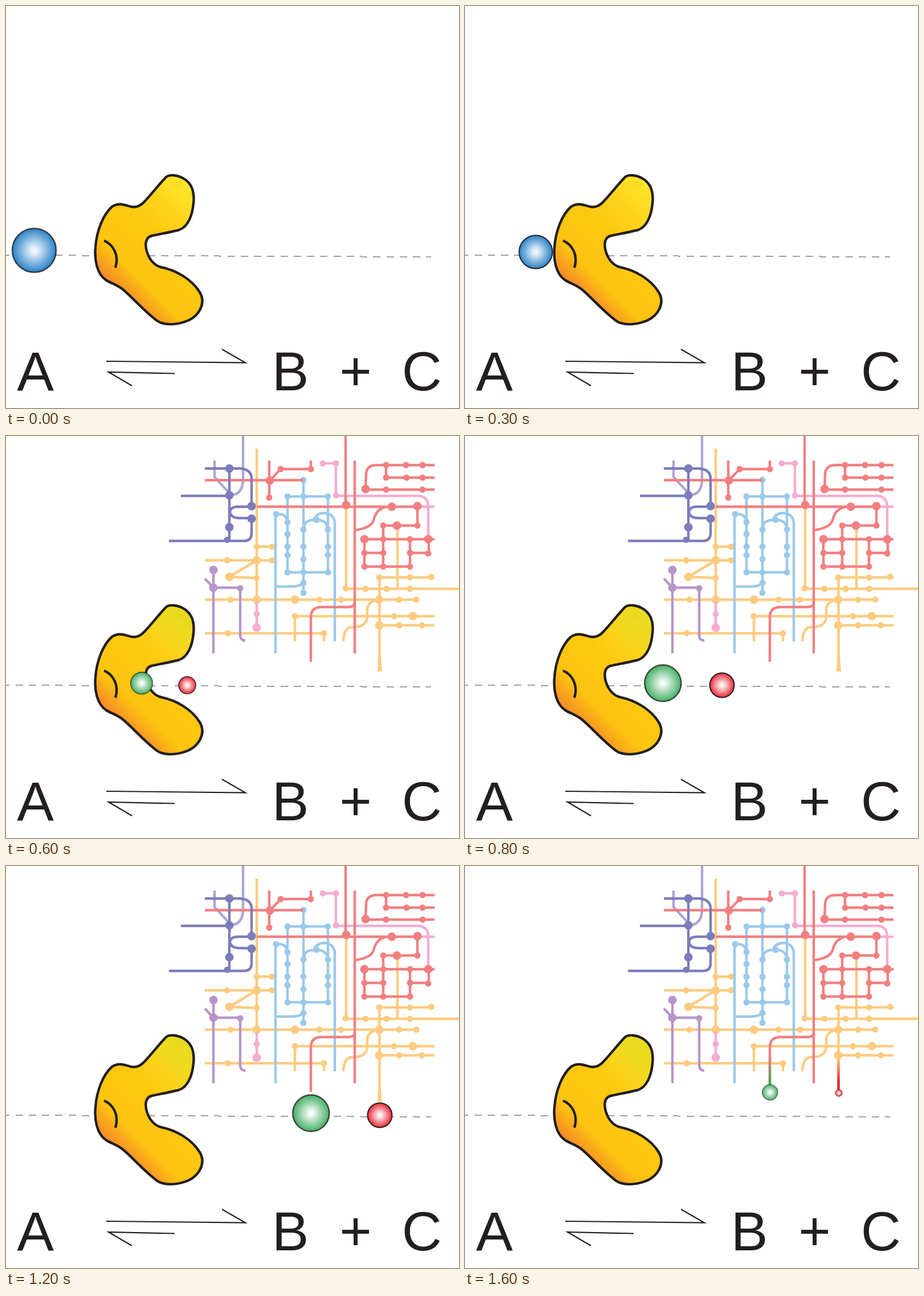
An HTML page for the animation above (1900 ms loop, 795 px wide and 705 px high).

```html
<!DOCTYPE html>
<html lang="en">
<head>
<meta charset="utf-8">
<title>Enzyme reaction</title>
<style>
html, body { margin: 0; width: 100%; height: 100%; overflow: hidden; background: #fff; }
svg { display: block; width: 795px; height: 705px; }
text { font: 97px "Liberation Sans", Arial, sans-serif; text-anchor: middle; fill: #231f20; }

.ink { fill: none; stroke: #231f20; stroke-width: 4.4; }
.map { fill: none; stroke-width: 4.4; stroke-linejoin: round; }
.dots { stroke-width: 11; stroke-linecap: round; }
.big { stroke-width: 15; stroke-linecap: round; }
.indigo { stroke: #7b7dbb; }
.lavender { stroke: #aaa7d4; }
.red { stroke: #f27f80; }
.pink { stroke: #f4add0; }
.orange { stroke: #fdcb80; }
.blue { stroke: #9ac9ea; }
.violet { stroke: #b994c9; }

/* 17 poses of 100 ms, the last one held to 1900 ms */
.phase2, .stub, .glow, .ball { animation: 1.9s step-end infinite; }
.phase2 { animation-name: show; }
.stub { animation-name: drop; }
.glow { animation-name: glow; }
.ball { stroke: #231f20; stroke-width: 2; }
#a { animation-name: enter, leave; vector-effect: non-scaling-stroke; }
#b { animation-name: exitB; }
#c { animation-name: exitC; }

@keyframes show { 0% { opacity: 0; } 31.578%, 100% { opacity: 1; } }
@keyframes leave { 0% { opacity: 1; } 31.578%, 100% { opacity: 0; } }
@keyframes drop { 0% { opacity: 1; } 84.21%, 100% { opacity: 0; } }
@keyframes glow {
  0% { opacity: 0; }
  63.157% { opacity: 0; animation-timing-function: steps(4); }
  84.21%, 100% { opacity: 1; }
}
@keyframes enter {
  0% { transform: translate(49.5px, 428.5px); animation-timing-function: steps(2); }
  10.526% { transform: translate(94.3px, 428.5px); animation-timing-function: steps(3); }
  26.315%, 100% { transform: translate(183.8px, 437px) scale(.275); }
}
@keyframes exitB {
  0%, 31.578% { transform: translate(238px, 433.5px) scale(.6); animation-timing-function: steps(2); }
  42.105% { transform: translate(347.3px, 433.5px); animation-timing-function: steps(2); }
  52.631% { transform: translate(462.5px, 433.5px); animation-timing-function: steps(2); }
  63.157% { transform: translate(535.3px, 433.5px); animation-timing-function: steps(4); }
  84.21%, 100% { transform: translate(535.3px, 397px) scale(.43); }
}
@keyframes exitC {
  0%, 31.578% { transform: translate(318px, 437px) scale(.7); animation-timing-function: steps(2); }
  42.105% { transform: translate(451px, 437px); animation-timing-function: steps(2); }
  52.631% { transform: translate(562px, 437px); animation-timing-function: steps(2); }
  63.157% { transform: translate(656px, 437px); animation-timing-function: steps(4); }
  84.21%, 100% { transform: translate(656px, 398px) scale(.29); }
}
</style>
</head>
<body>
<svg viewBox="0 0 795 705">
  <defs>
    <linearGradient id="body" gradientUnits="userSpaceOnUse" x1="180" y1="490" x2="345" y2="325">
      <stop offset="0" stop-color="#f4832d"/>
      <stop offset=".2" stop-color="#fdc40f"/>
      <stop offset=".5" stop-color="#fdc70f"/>
      <stop offset=".75" stop-color="#fed61d"/>
      <stop offset="1" stop-color="#ffe92c"/>
    </linearGradient>
    <linearGradient id="tip" gradientUnits="userSpaceOnUse" x1="270" y1="375" x2="318" y2="312">
      <stop offset="0" stop-color="#e2d81e" stop-opacity="0"/>
      <stop offset="1" stop-color="#e2d81e" stop-opacity=".85"/>
    </linearGradient>
    <radialGradient id="fillA">
      <stop offset="0" stop-color="#f2f8fd"/>
      <stop offset=".15" stop-color="#e4f0fa"/>
      <stop offset="1" stop-color="#2a82c7"/>
    </radialGradient>
    <radialGradient id="fillB">
      <stop offset="0" stop-color="#fff"/>
      <stop offset=".15" stop-color="#eff8f1"/>
      <stop offset="1" stop-color="#45b065"/>
    </radialGradient>
    <radialGradient id="fillC">
      <stop offset="0" stop-color="#fff"/>
      <stop offset=".15" stop-color="#fdeeee"/>
      <stop offset="1" stop-color="#ec2836"/>
    </radialGradient>
    <linearGradient id="tailB" gradientUnits="userSpaceOnUse" x1="0" y1="335" x2="0" y2="384">
      <stop offset="0" stop-color="#f27f80"/>
      <stop offset="1" stop-color="#36a85a"/>
    </linearGradient>
    <linearGradient id="tailC" gradientUnits="userSpaceOnUse" x1="0" y1="336" x2="0" y2="378">
      <stop offset="0" stop-color="#fdcb80"/>
      <stop offset="1" stop-color="#e8202f"/>
    </linearGradient>
    <path id="enzyme" d="M279 302C285 294 302 296 314 304C327 313 331 328 329 346C327 368 319 388 303 393C286 397 270 400 256 403C246 405 243 416 247 430C251 444 260 455 272 458C298 463 326 479 340 502C352 522 338 545 316 553C300 559 278 561 265 552C240 533 222 511 205 497C195 489 186 487 176 481C159 470 155 444 157 423C159 395 170 366 186 352C196 345 206 348 216 351C228 355 236 351 243 343C256 329 267 315 279 302Z"/>
  </defs>

  <line x1="0" y1="437" x2="746" y2="440" stroke="#a0a0a4" stroke-width="2" stroke-dasharray="13 10.25" stroke-dashoffset="6.5" shape-rendering="crispEdges"/>

  <g class="map phase2">
    <g class="lavender">
      <path d="M416 0V75Q416 104 392 104M366 43V72L392 100"/>
    </g>
    <g class="orange">
      <path d="M440 22V288M440 194H467M349 218H467M440 249L392 247L440 218M349 287H720M597 121V268H795M687 157V268"/>
      <path d="M752 248H655.5V396M507 360V316H752M655 332H752M349 346H558V360M592 360Q593 336 607 335Q632 336 634 318V305Q634 290 655 287"/>
      <path class="stub" d="M653.3 385L652 413H660L657.7 385Z" fill="#fdcb80" stroke="none"/>
      <path class="dots" d="M440 194h0M467 194h0M388 218h0M467 218h0M440 249h0M394 287h0M550 287h0M588 287h0M690 287h0M720 287h0M596 267h0M631 268h0M668 268h0M709 268h0M655 248h0M709 248h0M746 247h0M507 316h0M681 316h0M690 332h0M730 332h0M558 346h0M389 346h0"/>
      <path class="big" d="M440 218h0M392 247h0M440 287h0M507 287h0M655 287h0M714 316h0M655 332h0"/>
    </g>
    <g class="blue">
      <path d="M522 77V275M494 106H565V239H494ZM524 163V155Q527 147 545 147Q563 147 565 163M541 146Q545 135 560 135Q577 137 577 155V360M473 381V137H480Q492 137 494 151M474 264H505Q520 262 522 258"/>
      <path class="dots" d="M522 77h0M522 275h0M494 106h0M522 106h0M565 106h0M494 239h0M522 239h0M565 239h0M494 151h0M494 172h0M494 194h0M494 209h0M522 164h0M522 194h0M522 216h0M565 164h0M565 194h0M565 209h0M545 147h0M474 137h0M522 258h0"/>
    </g>
    <g class="pink">
      <path d="M554 48H579V105H725Q741 107 741 124V181M722 124H752M440 290V337"/>
      <path class="dots" d="M556 48h0M579 48h0M579 104h0M440 312h0"/>
      <path class="big" d="M440 336h0"/>
    </g>
    <g class="red">
      <path d="M349 77.5H522M462 43V108M463 78L482 58H535V43M440 124H722V157H662V229M596 0V121M612 43V381M612 165Q640 162 645 148Q650 126 670 124"/>
      <path d="M752 181H629V229H709V181M629 205H662M709 205H742V181M752 51H650Q634 51 632 65L631 94H752M667 51V73H752"/>
      <path d="M535 396V318Q535 301 552 300H600Q612 300 612 292"/>
      <path class="dots" d="M462 108h0M482 58h0M535 58h0M662 157h0M722 157h0M662 181h0M709 181h0M629 205h0M662 205h0M709 205h0M741 206h0M629 229h0M662 229h0M709 229h0M667 51h0M702 51h0M731 51h0M667 73h0M703 73h0M731 73h0M667 94h0M731 94h0"/>
      <path class="big" d="M463 78h0M597 121h0M677 124h0M722 123h0M686 157h0M629 181h0M741 181h0M631 93h0"/>
    </g>
    <g class="indigo">
      <path d="M349 57H410Q431 58 431 75V124H408Q393 124 393 134Q395 144 410 144H431V172Q430 184 418 184H286M307 105H392M392 57V184"/>
      <path class="dots" d="M388 182h0"/>
      <path class="big" d="M392 57h0M392 104h0M392 160h0M431 123h0M431 145h0"/>
    </g>
    <g class="violet">
      <path d="M364 234V381M349 250L364 266H411V350Q411 358 420 359"/>
      <path class="dots" d="M411 267h0"/>
      <path class="big" d="M364 235h0M364 266h0"/>
    </g>
    <g class="glow">
      <path d="M535 335V390" stroke="url(#tailB)"/>
      <path d="M655.5 338V395" stroke="url(#tailC)"/>
    </g>
  </g>

  <use href="#enzyme" fill="url(#body)"/>
  <path d="M296 308h14l3 6l-5 6h-10l-4-6ZM321 328l6-1v10l-6-3Z" fill="#f2db28" opacity=".7"/>
  <use href="#enzyme" class="phase2" fill="url(#tip)"/>
  <g class="ink">
    <use href="#enzyme"/>
    <path d="M172 411.5C188 418 199 437 192 459"/>
    <path d="M176 623L420 625.5L379 602M296 644.5L180 642L221 666" stroke-width="2.2"/>
  </g>

  <text x="51.5" y="674">A</text>
  <text x="499" y="674">B</text>
  <text x="613.5" y="674">+</text>
  <text x="729.7" y="674">C</text>

  <circle id="a" class="ball" r="38.5" fill="url(#fillA)"/>
  <g class="phase2">
    <circle id="b" class="ball" r="32" fill="url(#fillB)"/>
    <circle id="c" class="ball" r="21.5" fill="url(#fillC)"/>
  </g>
</svg>
</body>
</html>
```
